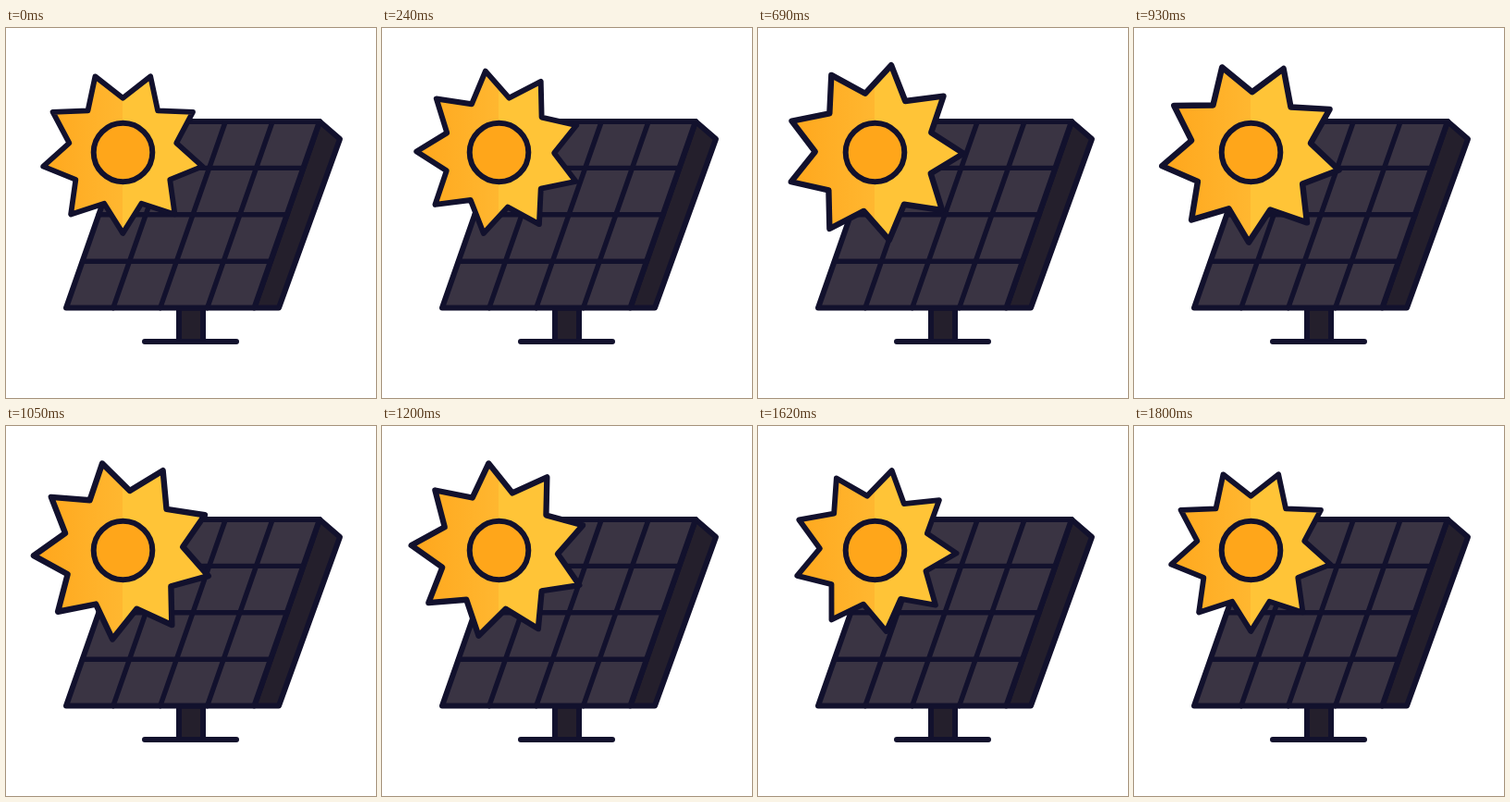
Write an HTML page with a canvas that moves like this. It is 400x400 px and loops after 1830 ms.

```html
<!DOCTYPE html>
<html lang="en">
<head>
<meta charset="utf-8">
<title>Solar panel</title>
<style>
  html, body { margin: 0; width: 100%; height: 100%; overflow: hidden; background: #fff; }
  canvas { display: block; width: 400px; height: 400px; }
</style>
</head>
<body>
<canvas id="stage" width="400" height="400"></canvas>
<script>
const ctx = document.getElementById('stage').getContext('2d');
const LOOP = 1830, STEP = 30, STEPS = 60;
const INK = '#12112d', FACE = '#3a3443', SIDE = '#241f2c';
const PEN = 6;
const SUN = { x: 126.3, y: 134.5, tip: 87.4, notch: 58.8, rays: 9 };

function shape(points, fill) {
  ctx.beginPath();
  points.forEach(([x, y]) => ctx.lineTo(x, y));
  ctx.closePath();
  ctx.fillStyle = fill;
  ctx.fill();
  ctx.stroke();
}

function line(x1, y1, x2, y2) {
  ctx.beginPath();
  ctx.moveTo(x1, y1);
  ctx.lineTo(x2, y2);
  ctx.stroke();
}

function drawPanel() {
  const top = 101, bottom = 302.6, left = 65, width = 203.4, slant = 70.6;
  const right = left + width;
  ctx.lineWidth = PEN;
  shape([[187, bottom], [213, bottom], [213, 339], [187, 339]], SIDE);
  line(150, 339, 249, 339);
  shape([[right + slant, top], [361, 120], [295, bottom], [right, bottom]], SIDE);
  shape([[left + slant, top], [right + slant, top], [right, bottom], [left, bottom]], FACE);
  ctx.lineWidth = 5.4;
  for (let i = 1; i < 4; i++) {
    const k = i / 4;
    const x = left + width * k;
    const y = top + (bottom - top) * k;
    const shift = left + slant * (1 - k);
    line(x, bottom, x + slant, top);
    line(shift, y, shift + width, y);
  }
}

function sunFill() {
  const g = ctx.createLinearGradient(36, 0, 216, 0);
  g.addColorStop(0, '#ffa71d');
  g.addColorStop(0.5, '#ffb730');
  g.addColorStop(0.5, '#ffc437');
  g.addColorStop(1, '#ffc437');
  return g;
}

function drawSun(p) {
  const scale = 1 + 0.112 * (1 - Math.cos(2 * Math.PI * p)) / 2;
  const turn = (90 + 80 * p) * Math.PI / 180;
  const points = [];
  for (let i = 0; i < SUN.rays * 2; i++) {
    const r = scale * (i % 2 ? SUN.notch : SUN.tip);
    const a = turn + i * Math.PI / SUN.rays;
    points.push([SUN.x + r * Math.cos(a), SUN.y + r * Math.sin(a)]);
  }
  ctx.lineWidth = 5.8 * scale;
  shape(points, sunFill());

  ctx.lineWidth = PEN;
  ctx.beginPath();
  ctx.arc(126.5, 134.5, 31.8, 0, 2 * Math.PI);
  ctx.fillStyle = '#ffa61a';
  ctx.fill();
  ctx.stroke();
}

function draw(now) {
  const step = Math.min(STEPS, Math.floor((now % LOOP) / STEP));
  ctx.fillStyle = '#fff';
  ctx.fillRect(0, 0, 400, 400);
  ctx.strokeStyle = INK;
  ctx.lineJoin = ctx.lineCap = 'round';
  drawPanel();
  drawSun(step / STEPS);
}

let start = null;
function tick(now) {
  if (start === null) start = now;
  draw(Math.max(0, now - start));
  requestAnimationFrame(tick);
}
draw(0);
requestAnimationFrame(tick);
</script>
</body>
</html>
```
